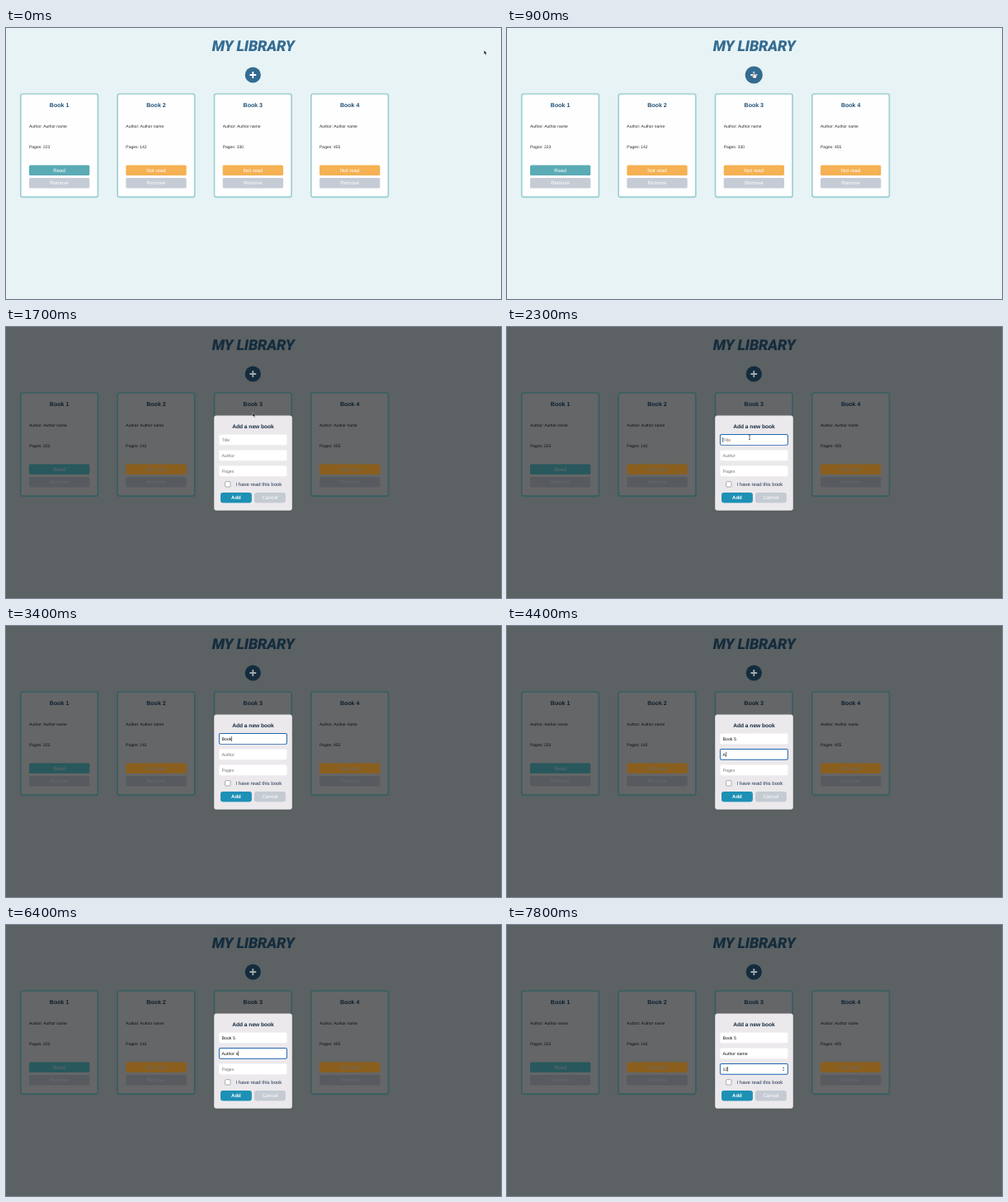
Recreate the animation shown at these times as an HTML page. Size 600 by 329 pixels, loop 8000 ms.

```html
<!DOCTYPE html>
<html lang="en">
<head>
<meta charset="utf-8">
<title>My Library</title>
<style>
  html, body { margin: 0; width: 100%; height: 100%; overflow: hidden; }
  svg {
    display: block; width: 100%; height: 100%;
    font-family: "Liberation Sans", Arial, sans-serif;
    text-rendering: geometricPrecision;
    --page: #e8f3f5; --card: #fefefe; --edge: #9fd0d4; --ink: #2a2d30; --head: #1f4f74;
    --brand: #346b91; --plus: #fff; --label: #fff;
    --read: #5aabb5; --unread: #f5b153; --remove: #c5ccd6;
  }
  svg.dim {
    --page: #5c6163; --card: #656667; --edge: #365f63; --ink: #101214; --head: #0c2030;
    --brand: #142c3d; --plus: #a3abaf; --label: #686a6b;
    --read: #28585d; --unread: #8a5f1e; --remove: #575b60;
  }
  .title { font: italic 900 18px Roboto, sans-serif; letter-spacing: -0.2px; }
  .bold { font-weight: 700; }
</style>
</head>
<body>
<svg id="stage" viewBox="0 0 600 329"></svg>
<script>
const LOOP = 8000;
const stage = document.getElementById('stage');

function add(parent, tag, attrs, text) {
  const el = document.createElementNS('http://www.w3.org/2000/svg', tag);
  for (const key in attrs) el.setAttribute(key, attrs[key]);
  if (text) el.textContent = text;
  parent.appendChild(el);
  return el;
}

const box = (parent, x, y, width, height, rx, fill, more) =>
  add(parent, 'rect', { x, y, width, height, rx, fill, ...more });

const label = (parent, x, y, size, fill, text, more) =>
  add(parent, 'text', { x, y, 'font-size': size, fill, ...more }, text);

const centered = { 'text-anchor': 'middle' };
const boldCentered = { ...centered, class: 'bold' };

// Page
box(stage, 0, 0, 600, 329, 0, 'var(--page)');
add(stage, 'text', { x: 299.6, y: 27.8, class: 'title', fill: 'var(--brand)', ...centered }, 'MY LIBRARY');
const disc = add(stage, 'circle', { cx: 299.3, cy: 57, r: 9.6, fill: 'var(--brand)' });
add(stage, 'path', { d: 'M295.4 57h7.8M299.3 53.1v7.8', stroke: 'var(--plus)', 'stroke-width': 1.8 });

function drawCard(index, pages) {
  const card = add(stage, 'g', { transform: `translate(${17.8 + index * 117.35} 80)` });
  const button = (y, fill, text) => {
    box(card, 10.2, y, 73.3, 12.6, 1.6, fill);
    label(card, 46.8, y + 8.3, 6.1, 'var(--label)', text, centered);
  };
  box(card, 0, 0.3, 94, 126.2, 3, 'var(--edge)', { opacity: 0.5 });
  box(card, 0, 0, 93.6, 125.2, 2.4, 'var(--card)', { stroke: 'var(--edge)', 'stroke-width': 1.7 });
  label(card, 46.8, 16.2, 7.05, 'var(--head)', `Book ${index + 1}`, boldCentered);
  label(card, 10.2, 41.2, 5, 'var(--ink)', 'Author: Author name');
  label(card, 10.2, 65.9, 5, 'var(--ink)', `Pages: ${pages}`);
  if (index === 0) button(86.4, 'var(--read)', 'Read');
  else button(86.4, 'var(--unread)', 'Not read');
  button(102, 'var(--remove)', 'Remove');
}
[223, 142, 330, 455].forEach((pages, i) => drawCard(i, pages));

// Dialog
const dialog = add(stage, 'g', {});
box(dialog, 252.2, 107.4, 94.6, 115.4, 3, '#ece9ec');
label(dialog, 299.5, 122.8, 6.6, '#12293d', 'Add a new book', boldCentered);

// Each key is [time, text from then on].
const fields = [
  { hint: 'Title', from: 2200, to: 4100,
    keys: [[2900, 'B'], [3100, 'Bo'], [3300, 'Boo'], [3400, 'Book'], [3600, 'Book '], [3800, 'Book 5']] },
  { hint: 'Author', from: 4100, to: 7100,
    keys: [[4400, 'A'], [4600, 'Au'], [4800, 'Aut'], [4900, 'Auth'], [5000, 'Autho'], [5200, 'Author'],
      [6200, 'Author '], [6400, 'Author n'], [6500, 'Author na'], [6600, 'Author nam'], [6800, 'Author name']] },
  { hint: 'Pages', from: 7100, to: LOOP, keys: [[7500, '1'], [7700, '12']] }
];

fields.forEach((field, i) => {
  const y = 130.6 + i * 18.95;
  field.ring = box(dialog, 257.9, y - 0.5, 83, 13.7, 2.2, '#2166b0');
  box(dialog, 258.9, y + 0.4, 81, 11.9, 1.4, '#fff');
  field.edge = box(dialog, 258.4, y, 82, 12.7, 1.6, '#fff');
  field.text = label(dialog, 261.5, y + 8.2, 5.25, '#111', '', { style: 'white-space: pre' });
  field.caret = box(dialog, 261.5, y + 3.4, 0.55, 6, 0, '#111');
});
const spinner = add(dialog, 'path', {
  d: 'M333.9 174.1l1.2-1.6 1.2 1.6zM333.9 175.7l1.2 1.6 1.2-1.6z', fill: '#555'
});

box(dialog, 265.6, 187.7, 6.4, 6.4, 1, '#fff', { stroke: '#7b7b80', 'stroke-width': 0.6 });
label(dialog, 278.5, 193.3, 6.03, '#1c3450', 'I have read this book');
box(dialog, 260, 200.9, 37.9, 12.5, 3, '#1d90b5');
label(dialog, 278.9, 209.2, 6, '#fff', 'Add', boldCentered);
box(dialog, 301, 200.9, 37.9, 12.5, 3, '#c5cbd3');
label(dialog, 319.9, 209.2, 6.1, '#fff', 'Cancel', centered);

// Pointer shapes
const pointer = add(stage, 'g', {});
const outline = { stroke: '#fff', 'stroke-width': 0.4, 'stroke-linejoin': 'round' };
const shapes = {
  arrow: add(pointer, 'path', { d: 'M0 0v5l1.2-1 .8 1.9.9-.4-.8-1.8h1.5z', fill: '#111', ...outline }),
  hand: add(pointer, 'path', {
    d: 'M-.7-2.6q.7-.9 1.4 0v2l2.2.5q.6.3.5 1L2.8 3.6h-3.4L-2.7 1q.5-1 1.2-.3l.8.5z',
    fill: '#fff', stroke: '#1b2b36', 'stroke-width': 0.5
  }),
  beam: add(pointer, 'path', {
    d: 'M-1.1-2.8Q0-2.8 0-2Q0-2.8 1.1-2.8M0-2v4M-1.1 2.8Q0 2.8 0 2Q0 2.8 1.1 2.8',
    fill: 'none', stroke: '#222', 'stroke-width': 0.6
  })
};

const clamp = (v) => Math.min(1, Math.max(0, v));
const ease = (v) => v * v * (3 - 2 * v);
const progress = (t, from, to) => ease(clamp((t - from) / (to - from)));
const show = (el, on) => el.setAttribute('visibility', on ? 'inherit' : 'hidden');

function bezier(a, b, c, d, u) {
  const v = 1 - u;
  return a.map((_, i) =>
    v * v * v * a[i] + 3 * v * v * u * b[i] + 3 * v * u * u * c[i] + u * u * u * d[i]);
}

const REST = [579.4, 27], PLUS = [299.4, 57.3], INPUT = [294, 134];

function pointerAt(t) {
  if (t < 1200) return bezier(REST, [460, 40], [240, 220], PLUS, progress(t, 50, 850));
  return bezier(PLUS, [304, 80], [298, 115], INPUT, progress(t, 1200, 2100));
}

function drawPointer(t) {
  const [x, y] = pointerAt(t);
  const shape = t > 750 && t < 1250 ? 'hand' : t >= 1200 && y > 130 ? 'beam' : 'arrow';
  pointer.setAttribute('transform', `translate(${x} ${y})`);
  show(pointer, t < 2800);
  for (const name in shapes) show(shapes[name], name === shape);
}

function drawField(field, t) {
  const focused = t >= field.from && t < field.to;
  const typed = field.keys.filter(([at]) => at <= t).pop();
  const text = typed ? typed[1] : '';
  const since = t - (typed ? typed[0] : field.from);
  field.text.textContent = text || field.hint;
  field.text.setAttribute('fill', text ? '#111' : '#757575');
  show(field.ring, focused);
  show(field.edge, !focused);
  show(field.caret, focused && since % 1000 < 500);
  const width = text ? field.text.getComputedTextLength() : 0;
  field.caret.setAttribute('x', 261.5 + width);
}

function draw(t) {
  const open = t >= 1000;
  stage.classList.toggle('dim', open);
  dialog.style.display = open ? '' : 'none';
  disc.setAttribute('r', 9.6 + progress(t, 750, 900) - progress(t, 1150, 1350));
  if (open) fields.forEach((field) => drawField(field, t));
  show(spinner, t >= 7100);
  drawPointer(t);
}

const start = performance.now();
function tick() {
  draw((performance.now() - start) % LOOP);
  requestAnimationFrame(tick);
}
tick();
</script>
</body>
</html>
```
